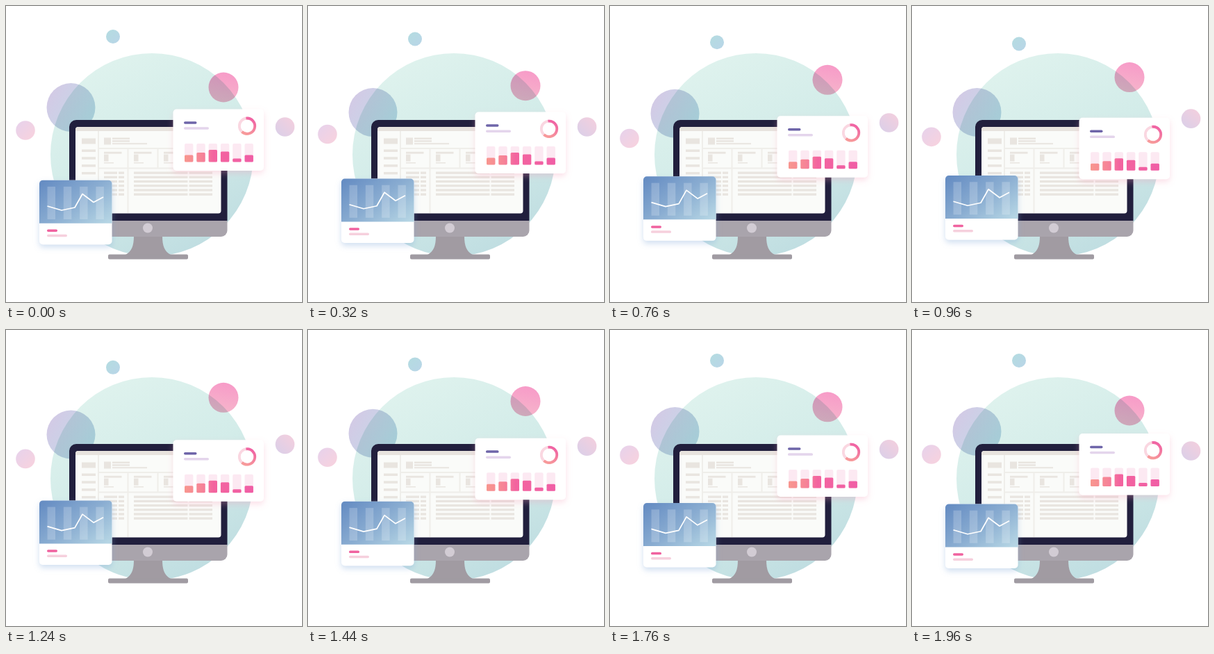
An HTML page that plays this animation: 426x426 px, repeating every 2000 ms.

```html
<!DOCTYPE html>
<html lang="en">
<head>
<meta charset="utf-8">
<title>Dashboard illustration</title>
<style>
html, body { margin: 0; width: 100%; height: 100%; overflow: hidden; background: #fff; }
svg { display: block; width: 100vw; height: 100vh; }
.bubble { mix-blend-mode: multiply; }
</style>
</head>
<body>
<svg viewBox="0 0 426 426">
  <defs>
    <linearGradient id="disc" x1=".2" y1="0" x2=".7" y2="1">
      <stop offset="0" stop-color="#e0f3ee"/><stop offset=".5" stop-color="#d3ece9"/><stop offset="1" stop-color="#bfdde1"/>
    </linearGradient>
    <linearGradient id="violet" x1="0" y1=".2" x2="1" y2=".8">
      <stop offset="0" stop-color="#d4c9e5"/><stop offset="1" stop-color="#c1dcea"/>
    </linearGradient>
    <linearGradient id="rose" x1=".6" y1="0" x2=".4" y2="1">
      <stop offset="0" stop-color="#f79bc8"/><stop offset="1" stop-color="#f6b6cb"/>
    </linearGradient>
    <linearGradient id="blush" x1="0" y1="0" x2="1" y2="1">
      <stop offset="0" stop-color="#e6d2ec"/><stop offset="1" stop-color="#f9d2dd"/>
    </linearGradient>
    <linearGradient id="mauve" x1="0" y1="1" x2="1" y2="0">
      <stop offset="0" stop-color="#d9cfe9"/><stop offset="1" stop-color="#f5cfdd"/>
    </linearGradient>
    <linearGradient id="teal" x1="0" y1="0" x2="1" y2="1">
      <stop offset="0" stop-color="#b4dce0"/><stop offset="1" stop-color="#b9d5e8"/>
    </linearGradient>
    <linearGradient id="sky" x1="0" y1=".1" x2="1" y2=".9">
      <stop offset="0" stop-color="#668dc3"/><stop offset=".5" stop-color="#89acd1"/><stop offset="1" stop-color="#b5d5e4"/>
    </linearGradient>
    <linearGradient id="heat" gradientUnits="userSpaceOnUse" x1="257" y1="0" x2="356" y2="0">
      <stop offset="0" stop-color="#f8968f"/><stop offset=".25" stop-color="#f68497"/><stop offset=".42" stop-color="#f3649f"/><stop offset="1" stop-color="#f05ea5"/>
    </linearGradient>
    <linearGradient id="ring" x1=".7" y1="0" x2=".3" y2="1">
      <stop offset="0" stop-color="#f062a4"/><stop offset="1" stop-color="#f79a9a"/>
    </linearGradient>
    <filter id="pinkShadow" x="-20%" y="-20%" width="140%" height="150%">
      <feDropShadow dx="0" dy="4" stdDeviation="4" flood-color="#f49fb9" flood-opacity=".32"/>
    </filter>
    <filter id="blueShadow" x="-20%" y="-20%" width="140%" height="150%">
      <feDropShadow dx="0" dy="4" stdDeviation="4" flood-color="#7fa6d8" flood-opacity=".36"/>
    </filter>
  </defs>

  <rect width="426" height="426" fill="#fff"/>
  <circle cx="210" cy="214" r="146" fill="url(#disc)"/>
  <g id="bubbles"></g>

  <path d="M184 331C184 345 181 353 172 358H237C228 353 225 345 225 331Z" fill="#a19ba2"/>
  <rect x="147" y="357.5" width="115" height="7" rx="2" fill="#a09ba2"/>
  <path d="M91 309V174a10 10 0 0 1 10-10H308.500a10 10 0 0 1 10 10V309Z" fill="#211f3d"/>
  <path d="M91 309H318.500V323a9 9 0 0 1-9 9H100a9 9 0 0 1-9-9Z" fill="#a9a4ac"/>
  <circle cx="204" cy="319.500" r="7" fill="#d2ccd4"/>
  <rect x="100" y="174" width="209.500" height="124.500" rx="4" fill="#fafbf9"/>
  <path d="M100 180V178a4 4 0 0 1 4-4H305.500a4 4 0 0 1 4 4V180Z" fill="#e7e3de"/>
  <path d="M133 180V298M133 205H309M133 233.500H309M175.500 205V298M218.500 205V233" fill="none" stroke="#efeeea" stroke-width="2"/>
  <g id="page" fill="#e9e5e0"></g>

  <g id="lineCard">
    <rect x="48" y="250.700" width="104.500" height="92.500" rx="5" fill="#fff" filter="url(#blueShadow)"/>
    <path d="M48 312.700V255.700a5 5 0 0 1 5-5H147.500a5 5 0 0 1 5 5V312.700Z" fill="url(#sky)"/>
    <g id="columns" fill="#fff" fill-opacity=".2"></g>
    <path d="M59.500 288L80 294 99 290 110 270.500 126 282.500 140 275" fill="none" stroke="#fff" stroke-width="1.700" stroke-linejoin="round"/>
    <rect x="59" y="321.500" width="15" height="3.500" rx="1.700" fill="#f0629f"/>
    <rect x="59" y="328.700" width="29" height="3.500" rx="1.700" fill="#f6d0dd"/>
  </g>

  <g id="barCard">
    <rect x="240.500" y="148.500" width="130.500" height="88.500" rx="5" fill="#fff" filter="url(#pinkShadow)"/>
    <rect x="256" y="166.200" width="18.500" height="3.500" rx="1.700" fill="#6e65a9"/>
    <rect x="256" y="174.300" width="36" height="3.500" rx="1.700" fill="#e4d5ec"/>
    <circle cx="347" cy="172.700" r="11.200" fill="none" stroke="#fad7e1" stroke-width="3.800"/>
    <path id="arc" fill="none" stroke="url(#ring)" stroke-width="3.800"/>
    <g id="bars"></g>
  </g>
</svg>
<script>
const LOOP = 2000;
const byId = id => document.getElementById(id);

function add(parent, tag, attrs) {
  const node = document.createElementNS("http://www.w3.org/2000/svg", tag);
  for (const key in attrs) node.setAttribute(key, attrs[key]);
  return byId(parent).appendChild(node);
}
const block = (parent, x, y, width, height, extra) =>
  add(parent, "rect", { x, y, width, height, ...extra });

// keys: [time in ms, centre y], joined by straight lines
const bubbles = [
  { x: 93.5, r: 35, fill: "violet", keys: [[0, 146], [500, 157], [1760, 146], [LOOP, 146]] },
  { x: 313, r: 21.5, fill: "rose", keys: [[0, 117], [200, 117], [1240, 97.3], [LOOP, 117]] },
  { x: 154, r: 10, fill: "teal", keys: [[0, 44], [1130, 56.3], [1690, 44], [LOOP, 44]] },
  { x: 28, r: 13.8, fill: "blush", keys: [[0, 179], [710, 191], [1850, 179], [LOOP, 179]] },
  { x: 401.5, r: 13.8, fill: "mauve", keys: [[0, 174], [560, 174], [1000, 161], [1920, 174], [LOOP, 174]] }
];
for (const b of bubbles) {
  b.node = add("bubbles", "circle", { class: "bubble", cx: b.x, r: b.r, fill: `url(#${b.fill})` });
}

// Sidebar and page header
block("page", 109, 190.5, 20, 8);
for (let i = 0; i < 4; i++) block("page", 109, 206.5 + i * 10.8, 20, 3.5);
block("page", 141, 189.5, 10, 10);
block("page", 153, 189.5, 25, 2.5);
block("page", 153, 193.2, 25, 2.5);
block("page", 153, 197.2, 50, 2);
// Summary tiles
for (const x of [141, 184, 227]) {
  block("page", x, 209.8, 25.5, 2.8);
  block("page", x, 213.6, 6.5, 10);
  block("page", x, 225, 14, 1.5);
}
// Tables
for (let i = 0; i < 6; i++) {
  const y = 238.5 + i * 6.2;
  for (const [x, w] of [[141, 19], [162, 8], [184, 77.5], [263.5, 33.5]]) block("page", x, y, w, 3.3);
}

for (let i = 0; i < 4; i++) block("columns", 59.5 + i * 23.3, 260, 11.5, 47);

[10, 13.5, 17.5, 15, 5, 10].forEach((h, i) => {
  const x = 257 + i * 17.3;
  block("bars", x, 198, 12.4, 26.5, { rx: 2, fill: "#fce9f2" });
  block("bars", x, 224.5 - h, 12.4, h, { rx: 1.5, fill: "url(#heat)" });
});

function ringPoint(degrees) {
  const a = degrees * Math.PI / 180;
  return `${347 + 11.2 * Math.sin(a)} ${172.7 - 11.2 * Math.cos(a)}`;
}
byId("arc").setAttribute("d", `M${ringPoint(-8)}A11.2 11.2 0 1 1 ${ringPoint(222)}`);

function valueAt(keys, t) {
  const i = keys.findIndex(k => k[0] > t);
  const [t0, v0] = keys[i - 1], [t1, v1] = keys[i];
  return v0 + (v1 - v0) * (t - t0) / (t1 - t0);
}
const shift = (id, y) => byId(id).setAttribute("transform", `translate(0 ${y})`);

function draw(t) {
  const swing = 1 - Math.abs(1 - t / 1000);
  shift("barCard", 12.8 * swing);
  shift("lineCard", -7 * swing);
  for (const b of bubbles) b.node.setAttribute("cy", valueAt(b.keys, t));
}

const start = performance.now();
function frame() {
  draw((performance.now() - start) % LOOP);
  requestAnimationFrame(frame);
}
draw(0);
requestAnimationFrame(frame);
</script>
</body>
</html>
```
